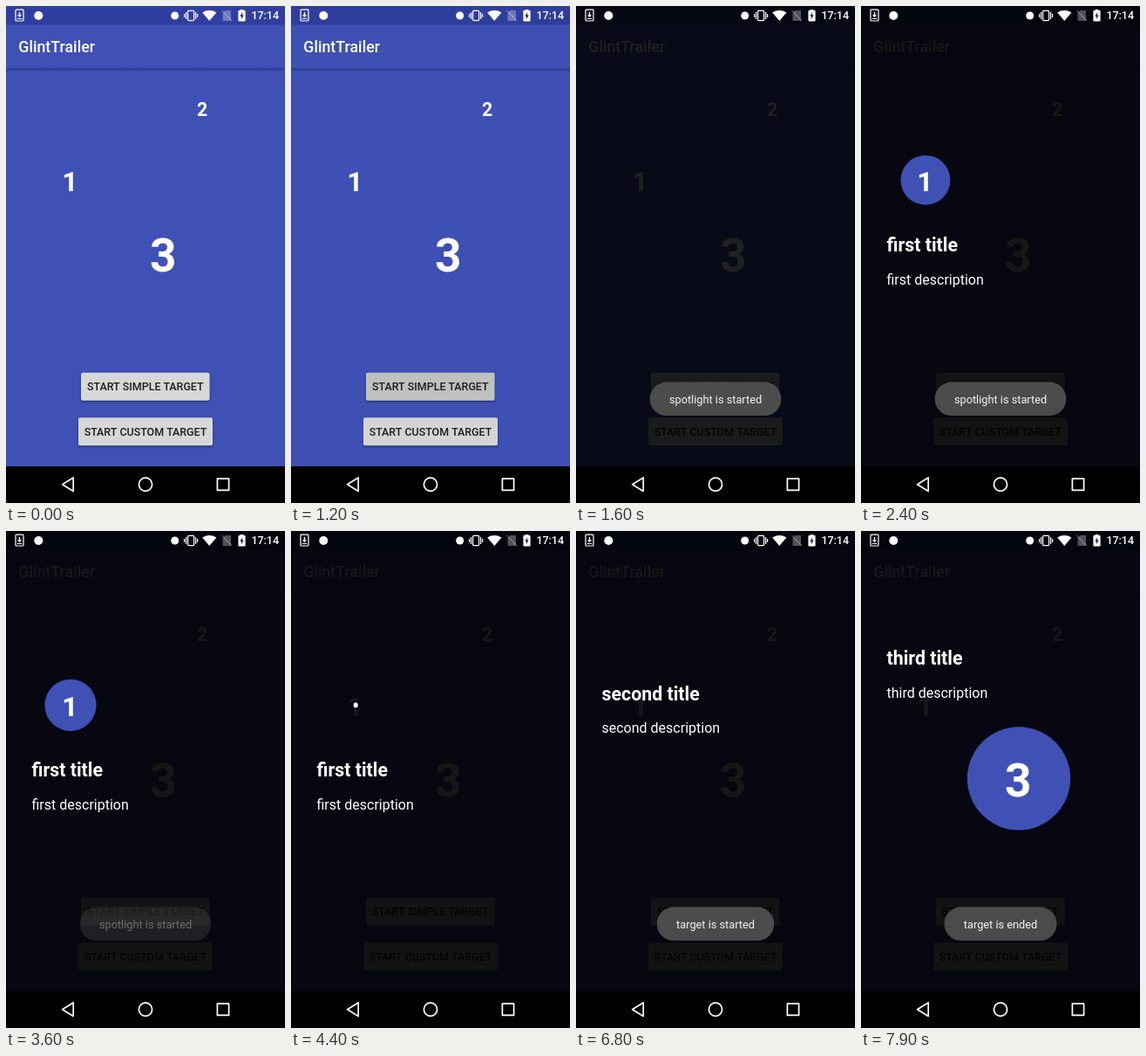
An HTML page with a canvas that plays this animation: 320 by 569 pixels, repeating every 8 s.

```html
<!DOCTYPE html>
<html lang="en">
<head>
<meta charset="utf-8">
<title>Guided tour</title>
<style>
html, body { margin: 0; width: 100%; height: 100%; overflow: hidden; background: #000; }
canvas { display: block; width: 320px; height: 569px; }
</style>
</head>
<body>
<canvas id="stage"></canvas>
<script>
const W = 320, H = 569, NAV_TOP = 527, LOOP = 8000;
const INK = '#fff', INDIGO = '#3f51b5';
const canvas = document.getElementById('stage');
const ctx = canvas.getContext('2d');
const dpr = window.devicePixelRatio || 1;
canvas.width = W * dpr;
canvas.height = H * dpr;

const targets = [
  { name: 'first', x: 74, y: 199.3, r: 29.6, textY: 281, open: 1850, close: 3960 },
  { name: 'second', x: 225, y: 117.6, r: 23.7, textY: 193.6, open: 4980, close: 6130 },
  { name: 'third', x: 181, y: 283.3, r: 59.2, textY: 152.8, open: 7080, close: Infinity }
];
const toasts = [
  { text: 'spotlight is started', from: 1240, to: 3200 },
  { text: 'target is started', from: 5020, to: 7100 },
  { text: 'target is ended', from: 7150, to: Infinity }
];

const clamp = v => Math.min(1, Math.max(0, v));
const easeOut = t => 1 - (1 - t) ** 4;
const easeInOut = t => 0.5 - Math.cos(Math.PI * t) / 2;

function rect(x, y, w, h, color) {
  ctx.fillStyle = color;
  ctx.fillRect(x, y, w, h);
}

function roundRect(x, y, w, h, r) {
  ctx.beginPath();
  ctx.moveTo(x + r, y);
  ctx.arcTo(x + w, y, x + w, y + h, r);
  ctx.arcTo(x + w, y + h, x, y + h, r);
  ctx.arcTo(x, y + h, x, y, r);
  ctx.arcTo(x, y, x + w, y, r);
  ctx.closePath();
}

function circle(x, y, r) {
  ctx.beginPath();
  ctx.arc(x, y, r, 0, Math.PI * 2);
}

function line(...p) {
  ctx.beginPath();
  for (let i = 0; i < p.length; i += 2) ctx.lineTo(p[i], p[i + 1]);
}

function text(str, x, y, size, weight, color, align = 'left') {
  ctx.font = `${weight} ${size}px Roboto, sans-serif`;
  ctx.textAlign = align;
  ctx.fillStyle = color;
  ctx.fillText(str, x, y);
}

function button(label, x, y, w, press) {
  ctx.save();
  ctx.shadowColor = 'rgba(0,0,30,.5)';
  ctx.shadowBlur = 2.5 * dpr;
  ctx.shadowOffsetY = 1.2 * dpr;
  roundRect(x, y, w, 32, 2);
  ctx.fillStyle = '#d6d7d7';
  ctx.fill();
  ctx.restore();
  if (press > 0) {
    ctx.fillStyle = `rgba(0,0,0,${0.1 * press})`;
    ctx.fill();
  }
  text(label, x + w / 2, y + 20.5, 12.44, 500, '#1d1d1d', 'center');
}

function app(t) {
  rect(0, 0, W, NAV_TOP, INDIGO);
  rect(0, 0, W, 21.5, '#303f9f');
  const shade = ctx.createLinearGradient(0, 71.5, 0, 75);
  shade.addColorStop(0, 'rgba(10,15,60,.45)');
  shade.addColorStop(1, 'rgba(10,15,60,0)');
  rect(0, 71.5, W, 3.5, shade);

  text('GlintTrailer', 14.3, 53, 17.78, 500, INK);
  text('1', 73.5, 211.8, 32, 700, INK, 'center');
  text('2', 225, 126.3, 21.3, 700, INK, 'center');
  text('3', 180.3, 304, 53.3, 700, INK, 'center');

  const press = Math.sin(Math.PI * clamp((t - 950) / 550));
  button('START SIMPLE TARGET', 86, 419.7, 147.6, press);
  button('START CUSTOM TARGET', 83, 471.3, 154, 0);
}

function spotlight(t) {
  const s = targets.filter(o => t >= o.open).pop();
  if (!s) return;
  const grow = easeOut(clamp((t - s.open) / 1000));
  const shrink = 1 - easeOut(clamp((t - s.close) / 1000));
  const r = s.r * grow * shrink;
  if (r > 0.4) {
    ctx.save();
    circle(s.x, s.y, r);
    ctx.clip();
    app(t);
    ctx.restore();
  }
  text(`${s.name} title`, 29.5, s.textY, 21.33, 700, INK);
  text(`${s.name} description`, 29.5, s.textY + 37.8, 16, 400, INK);
}

function toast({ text: label, from, to }, t) {
  const alpha = clamp((t - from) / 360) * (1 - clamp((t - to) / 500) ** 2);
  if (alpha <= 0) return;
  ctx.save();
  ctx.globalAlpha = alpha;
  ctx.font = '400 12.75px Roboto, sans-serif';
  const w = ctx.measureText(label).width + 44.5;
  roundRect(160 - w / 2, 430.5, w, 38.6, 19.2);
  ctx.fillStyle = 'rgba(80,80,80,.95)';
  ctx.fill();
  text(label, 160, 454.8, 12.75, 400, '#f4f4f4', 'center');
  ctx.restore();
}

function statusBar() {
  ctx.strokeStyle = ctx.fillStyle = INK;
  ctx.lineWidth = 1.2;

  // download
  roundRect(11, 4.2, 9, 12.8, 1);
  ctx.stroke();
  rect(14.8, 7, 1.4, 4, INK);
  line(12.8, 10.2, 18.2, 10.2, 15.5, 13);
  ctx.fill();
  rect(12.8, 14, 5.4, 1, INK);

  circle(37.3, 11, 5);
  ctx.fill();
  circle(193.7, 11, 4.5);
  ctx.fill();

  // vibrate
  roundRect(208.6, 5.4, 7, 11.2, 1);
  ctx.stroke();
  for (const side of [-1, 1]) {
    rect(212.1 + side * 5.5 - 0.6, 7, 1.2, 8, INK);
    rect(212.1 + side * 7.5 - 0.6, 9, 1.2, 4, INK);
  }

  // wireless
  ctx.beginPath();
  ctx.moveTo(233.3, 17);
  ctx.lineTo(225.2, 7.4);
  ctx.quadraticCurveTo(233.3, 2.6, 241.4, 7.4);
  ctx.closePath();
  ctx.fill();

  // missing SIM
  ctx.globalAlpha = 0.3;
  line(248.5, 8, 251.5, 5, 258, 5, 258, 17, 248.5, 17);
  ctx.fill();
  line(247.5, 5, 259, 17);
  ctx.stroke();
  ctx.globalAlpha = 1;

  // battery
  rect(268.7, 4, 3.6, 2, INK);
  roundRect(266.4, 5, 8.2, 12.4, 1);
  ctx.fillStyle = INK;
  ctx.fill();
  line(271.4, 7, 268.2, 11.8, 270.1, 11.8, 269.6, 15.5, 272.8, 10.5, 270.9, 10.5);
  ctx.fillStyle = '#20263a';
  ctx.fill();

  text('17:14', 313, 15.3, 12.44, 500, INK, 'right');
}

function navBar() {
  rect(0, NAV_TOP, W, H - NAV_TOP, '#000');
  ctx.strokeStyle = INK;
  ctx.lineWidth = 1.7;
  ctx.lineJoin = 'round';
  line(77.2, 540, 77.2, 555.4, 64.6, 547.7);
  ctx.closePath();
  ctx.stroke();
  circle(160, 547.7, 7.6);
  ctx.stroke();
  ctx.strokeRect(242.4, 541.2, 13.2, 13.2);
  ctx.lineJoin = 'miter';
}

function draw(t) {
  ctx.setTransform(dpr, 0, 0, dpr, 0, 0);
  const dim = easeInOut(clamp((t - 1165) / 500));
  app(t);
  rect(0, 0, W, NAV_TOP, `rgba(0,0,0,${0.91 * dim})`);
  spotlight(t);
  toasts.forEach(o => toast(o, t));
  statusBar();
  navBar();
}

const start = performance.now();
function tick() {
  draw((performance.now() - start) % LOOP);
  requestAnimationFrame(tick);
}
tick();
</script>
</body>
</html>
```
